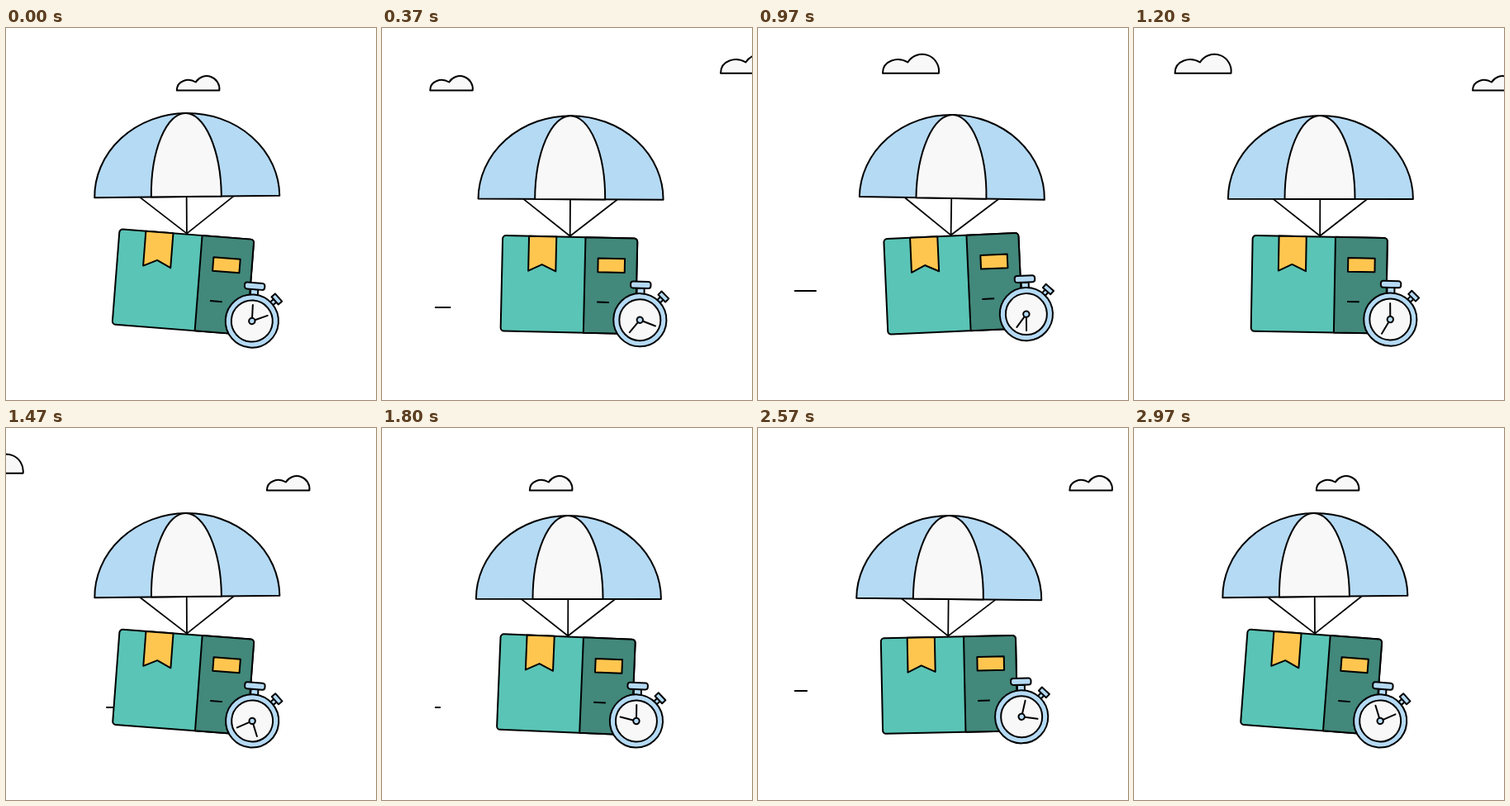
Write an HTML page that moves like this. It is 448x450 px and loops after 3010 ms.

```html
<!DOCTYPE html>
<html lang="en">
<head>
<meta charset="utf-8">
<title>Parachute delivery</title>
<style>
  html, body { margin: 0; width: 100%; height: 100%; overflow: hidden; background: #fff; }
  svg { display: block; width: 448px; height: 450px; }
  svg * { vector-effect: non-scaling-stroke; }
  .blue { fill: #b5daf4; }
  .pale { fill: #f8f8f8; }
  .gold { fill: #ffc64f; }
</style>
</head>
<body>
<svg viewBox="0 0 448 450" fill="none" stroke="#000" stroke-width="2" stroke-linejoin="round">
  <defs>
    <path id="cloud" class="pale" d="M0 0C0-12 14-15.5 23-10A15.45 15.45 0 0 1 51.5 0Z"/>
  </defs>
  <use class="small" href="#cloud"/>
  <use class="small" href="#cloud"/>
  <use class="small" href="#cloud"/>
  <use id="big" href="#cloud"/>
  <path id="wind"/>
  <path id="strings" stroke-width="1.8"/>
  <g id="canopy">
    <path class="blue" d="M-112 0A112 101 0 0 1 112 0Z"/>
    <path class="pale" d="M-43.4 0A42.5 101 0 0 1 41.6 0Z"/>
  </g>
  <g id="parcel">
    <rect x="-81.5" y="1" width="163.2" height="115.6" rx="4" fill="#5ac4b6"/>
    <path fill="#42887b" d="M18.8 1H77.7a4 4 0 0 1 4 4V112.6a4 4 0 0 1-4 4H18.8Z"/>
    <path class="gold" d="M-49.6 1V43L-33.2 35L-16.4 43V1Z"/>
    <rect class="gold" x="34.6" y="26" width="32.4" height="16.6"/>
    <path d="M34.3 79H49"/>
    <g transform="translate(86.9 99.5)">
      <g class="blue">
        <rect x="-4.5" y="-38.5" width="9" height="8"/>
        <rect x="-12.2" y="-46.5" width="24.4" height="8" rx="3"/>
        <g transform="rotate(44)">
          <rect x="-2.5" y="-38" width="5" height="7"/>
          <rect x="-6.2" y="-43" width="12.4" height="5.8"/>
        </g>
        <circle r="32.1"/>
      </g>
      <circle class="pale" r="25"/>
      <path id="fast" d="M0 0V-19.5" stroke-linecap="round"/>
      <path id="slow" d="M0 0V-20" stroke-linecap="round"/>
      <circle class="blue" r="3.7"/>
    </g>
  </g>
</svg>
<script>
const LOOP = 3010, FRAMES = 90;
const $ = id => document.getElementById(id);
const clouds = document.querySelectorAll('.small');
const place = (el, x, y, more = '') => el.setAttribute('transform', `translate(${x} ${y}) ${more}`);
const turn = (el, deg) => el.setAttribute('transform', `rotate(${deg})`);
const ease = p => (1 - Math.cos(Math.PI * Math.min(1, Math.max(0, p)))) / 2;

// Leftward drift, fastest at the middle of the stage
const drift = (d, mid, reach) => Math.abs(d) < 32 ? mid - reach * Math.sin(0.045 * d) : -200;

// A streak whose tail follows its head along a 111 px track
function streak(n, start, end, y) {
  const x = p => end + 111 * (1 - ease(p));
  const head = x((n - start) / 9.6), tail = x((n - start - 2.1) / 15);
  return tail - head > 0.1 ? `M${head} ${y}H${tail}` : '';
}

function draw(n) {
  [0.5, 52.5, 90.5].forEach((mid, i) => place(clouds[i], drift(n - mid, 199.8, 311), 75.5));
  place($('big'), drift(n - 25.6, 202.7, 339.5), 54.7, 'scale(1.32)');

  $('wind').setAttribute('d',
    streak(n, -2, 64, 338) + streak(n, 39.3, 64, 338) + streak(n, 88.3, 64, 338) +
    streak(n, 16.8, 44, 318) + streak(n, 63.6, 44, 318));

  // Two swings per loop; the parcel hangs from the knot of the strings
  const a = n * Math.PI / 22.5, c = Math.cos(a), s = Math.sin(a);
  const lift = 3.2 * c * c, tilt = 0.35 - c;
  const top = { x: 228.9 - 9.65 * c, y: 207.2 - lift };
  const knot = { x: 228 - 9.1 * c, y: 251.8 - lift };
  place($('canopy'), top.x, top.y, `rotate(${tilt})`);
  place($('parcel'), knot.x, knot.y, `rotate(${0.45 + 4 * c + 0.7 * s})`);
  $('strings').setAttribute('d', [-57.3, -0.6, 56.4].map(x =>
    `M${top.x + x} ${top.y + x * Math.tan(tilt * Math.PI / 180)}L${knot.x} ${knot.y}`).join(''));

  turn($('fast'), 20 * n - 1.4);
  turn($('slow'), 4 * n + 66);
}

const begin = performance.now();
function tick() {
  const t = (performance.now() - begin) % LOOP;
  draw(Math.min(FRAMES - 1, Math.floor((t + 3.4) * 0.03)));  // 30 poses a second
  requestAnimationFrame(tick);
}
tick();
</script>
</body>
</html>
```
